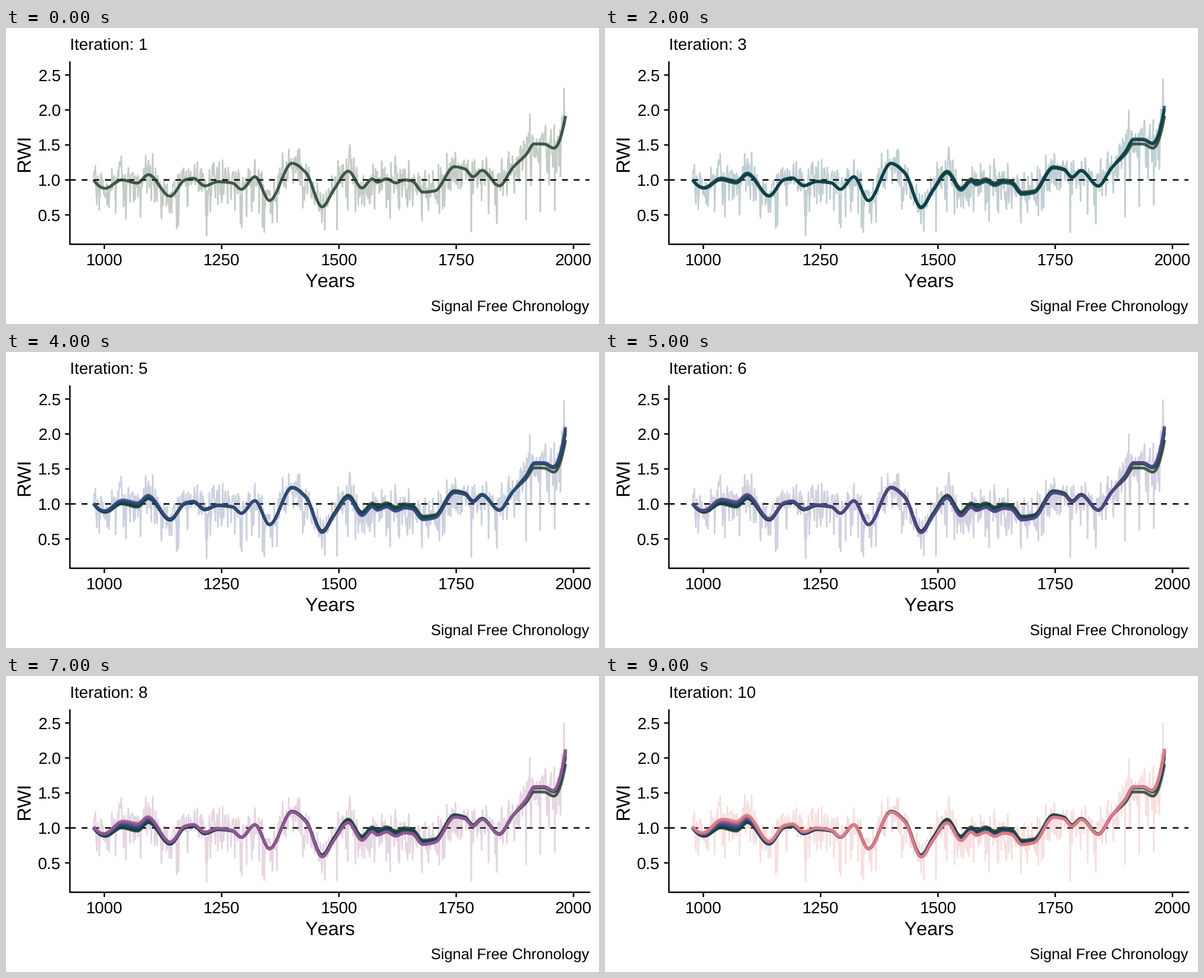
Recreate the animation shown at these times as a matplotlib script. Size 1058 by 529 pixels, loop 10 s.

```python
import numpy as np
import matplotlib.pyplot as plt
from matplotlib.animation import FuncAnimation

W, H, DPI = 1058, 529, 100
PT = 72 / DPI                 # points per pixel
UNIT = W / 6 / 72             # pixels per typographic point
THIN = W / 6 / 96 * 1.4226    # half-millimetre plot line
THICK = 2 * THIN
LEFT, RIGHT, TOP, BOTTOM = 114, 1041, 61, 386.5
TICK = 8.6
STEPS = 10

plt.rcParams.update({
    "font.family": "Liberation Sans",
    "text.hinting": "no_hinting",
    "text.kerning_factor": 6,
    "path.simplify": False,
    "path.snap": False,
})

COLORS = ["#1b3723", "#073b2f", "#0a4250", "#1b476f", "#37487d",
          "#534783", "#734f8f", "#985a8e", "#bb6787", "#e38383"]

# Turning points and shoulders of the smoothed chronology: year, index
TURNS = [
    (977, 1.0), (1002, .88), (1037, 1.0), (1070, .955), (1094, 1.075),
    (1140, .767), (1172, 1.0), (1190, 1.022), (1214, .915), (1242, .975),
    (1273, .955), (1292, .865), (1321, 1.045), (1352, .705), (1400, 1.238),
    (1430, 1.1), (1464, .615), (1490, .868), (1520, 1.125), (1549, .885),
    (1571, 1.013), (1582, .97), (1602, 1.015), (1621, .958), (1640, 1.0),
    (1657, .98), (1679, .825), (1705, .845), (1746, 1.188), (1769, 1.155),
    (1786, 1.045), (1805, 1.137), (1842, .915), (1870, 1.17), (1900, 1.37),
    (1916, 1.515), (1937, 1.513), (1958, 1.455), (1983, 1.915)]

# Years that stand out from the noise
OUTLIERS = {1218: .2, 1496: .29, 1782: .26, 1899: .43, 1929: .55,
            1960: .56, 1907: 1.94, 1980: 2.31}


def year_x(year):
    return 175.5 + 0.837 * (year - 1000)


def rwi_y(value):
    return 271.5 - 125 * (value - 1)


def monotone_curve(points, x):
    """Cubic through the points that is level at every peak and trough."""
    px, py = np.array(points).T
    h = np.diff(px)
    secant = np.diff(py) / h
    a, b = secant[:-1], secant[1:]
    level = a * b <= 0
    inner = np.where(level, 0, 2 * a * b / np.where(level, 1, a + b))
    slope = np.r_[2 * secant[0], inner, 2 * secant[-1]]
    i = np.clip(np.searchsorted(px, x, "right") - 1, 0, len(h) - 1)
    t = (x - px[i]) / h[i]
    ease = t * t * (3 - 2 * t)
    return (py[i] + (py[i + 1] - py[i]) * ease
            + h[i] * t * (1 - t) * (slope[i] * (1 - t) - slope[i + 1] * t))


def bump(center, width):
    return np.exp(-((years - center) / width) ** 2 / 2)


def ramp(start, end):
    return np.clip((years - start) / (end - start), 0, 1)


years = np.arange(977, 1984)
x = year_x(years)
smooth = monotone_curve(TURNS, years)


def drift(k):
    """Change of the index after k further iterations."""
    slow, fast = 1 - np.exp(-k / 3), 1 - np.exp(-k / 0.7)
    early = .14 * bump(1060, 43) + .035 * bump(1200, 55)
    middle = -.084 * bump(1615, 108)
    return (early * k / (STEPS - 1)
            + (middle + .15 * ramp(1950, 1983) ** 2) * slow
            + .076 * ramp(1872, 1918) * fast)


def yearly_series():
    rng = np.random.default_rng(12)
    z = rng.normal(size=len(years))
    z[1:] += 0.35 * z[:-1]
    noise = np.where(z > 0, .13 * z, .12 * z - .045 * z**2)
    values = smooth + np.clip(noise, -.55, .38)
    for year, value in OUTLIERS.items():
        values[years == year] = value
    return values


yearly = yearly_series()

fig = plt.figure(figsize=(W / DPI, H / DPI), dpi=DPI, facecolor="white")
ax = fig.add_axes([0, 0, 1, 1])
ax.set(xlim=(0, W), ylim=(H, 0))
ax.axis("off")


def line(xs, ys, width=THIN, color="black", cap="butt", **kw):
    return ax.plot(xs, ys, color=color, lw=width * PT, solid_capstyle=cap,
                   dash_capstyle="butt", solid_joinstyle="round", **kw)[0]


def label(px, py, text, size, ha="center", **kw):
    return ax.text(px, py, text, fontsize=size * UNIT * PT, ha=ha,
                   va="baseline", rotation_mode="anchor", color="black", **kw)


line([LEFT, RIGHT], [rwi_y(1)] * 2, linestyle=(0, (4, 4)), zorder=1)
line([LEFT, LEFT, RIGHT], [TOP, BOTTOM, BOTTOM], cap="projecting", zorder=5)
for value in np.arange(0.5, 2.6, 0.5):
    y = rwi_y(value)
    line([LEFT - TICK, LEFT], [y, y])
    label(98, y + 10.4, f"{value:.1f}", 12, "right")
for year in range(1000, 2001, 250):
    px = year_x(year)
    line([px, px], [BOTTOM, BOTTOM + TICK])
    label(px, 424, str(year), 12)

label((LEFT + RIGHT) / 2, 463, "Years", 14)
label(42, (TOP + BOTTOM) / 2, "RWI", 14, rotation=90)
label(RIGHT - 1, 506, "Signal Free Chronology", 11, "right")
title = label(LEFT, 39, "", 12, "left")

pale = line(x, rwi_y(yearly), alpha=0.25, zorder=2)
curves = [line(x, rwi_y(smooth + drift(k)), THICK, color, alpha=0.8, zorder=3)
          for k, color in enumerate(COLORS)]


def update(k):
    title.set_text(f"Iteration: {k + 1}")
    pale.set_ydata(rwi_y(yearly + drift(k)))
    pale.set_color(COLORS[k])
    for i, curve in enumerate(curves):
        curve.set_visible(i <= k)
    return [title, pale, *curves]


anim = FuncAnimation(fig, update, frames=STEPS, interval=1000,
                     repeat=True, repeat_delay=0, blit=False)
plt.show()
```
